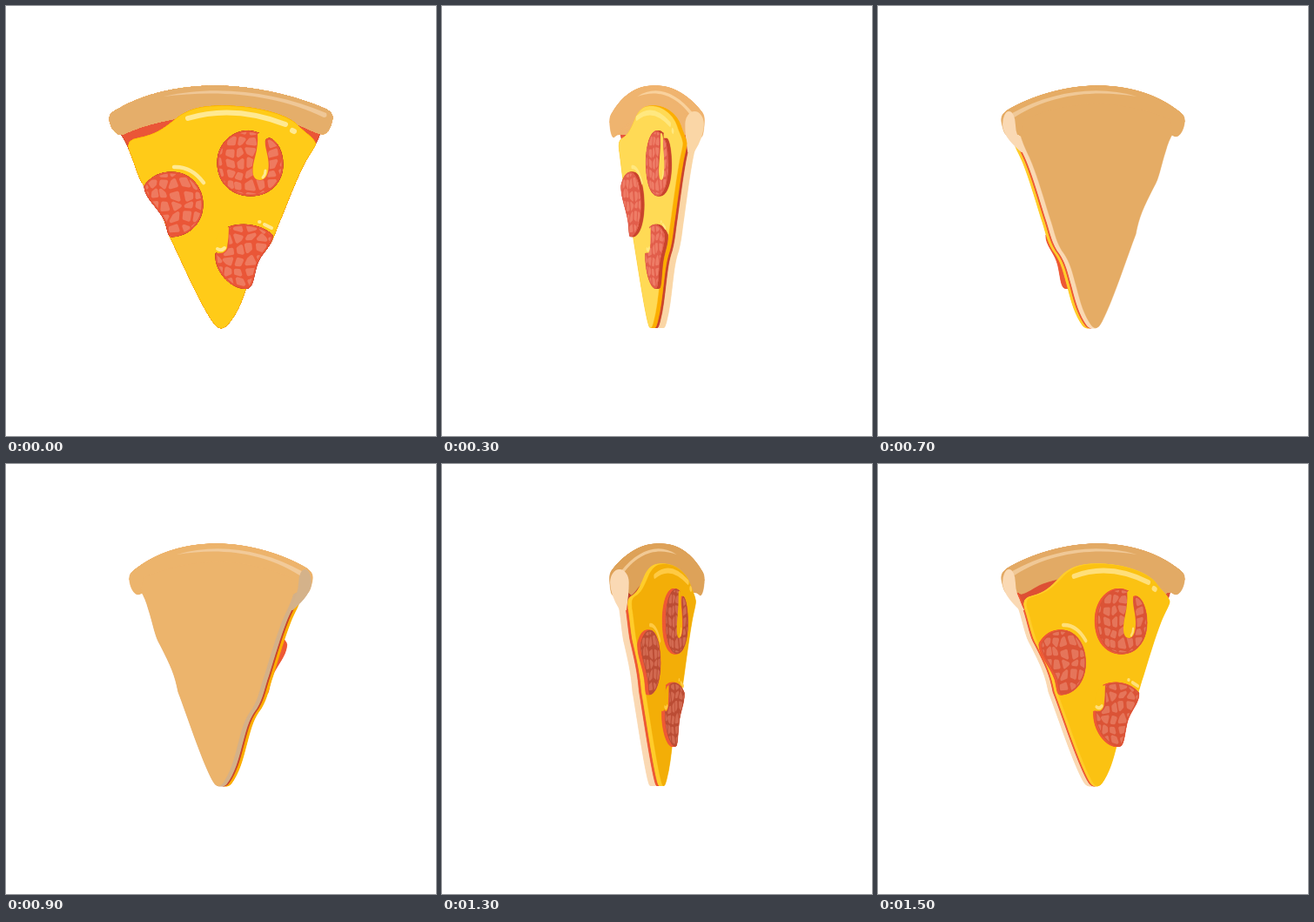
Recreate the animation shown at these times as an HTML page with a canvas. Size 494 by 494 pixels, loop 1.6 s.

```html
<!DOCTYPE html>
<html lang="en">
<head>
<meta charset="utf-8">
<title>Turning pizza slice</title>
<style>
html, body { margin: 0; width: 100%; height: 100%; overflow: hidden; background: #fff; }
canvas { display: block; }
</style>
</head>
<body>
<canvas width="494" height="494"></canvas>
<script>
const ctx = document.querySelector('canvas').getContext('2d');
const AXIS = 247;
const ANGLES = [0, 40, 55, 70, 90, 110, 125, 140];   // one half turn
const STEP = 100;

// Each tone runs from shaded through frontal to lit.
const TONES = {
  cheese: ['f0a803', 'ffcb18', 'ffdd62'],
  shine: ['ffc433', 'ffe992', 'ffe87c'],
  sauce: ['b8402a', 'ea5637', 'e8553f'],
  crust: ['dba056', 'e5ae6a', 'f1b570'],
  back: ['dba056', 'e8b06a', 'f6be72'],
  rim: ['f2c993', 'efc797', 'fbd39d'],
  meat: ['b14a33', 'ea5637', 'e0604f'],
  spot: ['cc664d', 'ee7a5f', 'ee7c68']
};

const EDGE = `C150 185 152 198 160 208 C176 232 182 242 187 262
  C200 288 222 340 238 363 Q247 377 257 363 C268 349 272 334 277 320
  C284 300 287 292 298 281 C308 268 309 258 316 243 C326 218 333 200 342 182`;
const body = new Path2D(`M131 146 C136 152 139 158 142 166 ${EDGE}
  C348 170 355 162 360 148 L355 130 Q247 95 135 130Z`);
const cheese = new Path2D(`M142 166 ${EDGE} C348 170 357 160 355 157
  C352 150 342 145 335 137 C322 124 285 115 250 115 C232 115 212 116 195 130
  C180 142 172 148 152 152 Q137 154 142 166Z`);
const crust = new Path2D(`M119 130 C119 124 122 122 128 119 C160 100 202 92 240 92
  C285 92 335 104 368 119 C374 122 376 126 374 133 C372 140 370 146 364 147
  C355 146 345 139 332 135 C285 122 220 122 190 130 C165 135 150 140 135 147
  C127 150 120 140 119 130Z`);
const rim = new Path2D('M181 104 C240 90 310 98 368 123 Q370 128 365 128 C310 101 245 96 181 104Z');
const drips = new Path2D(`M289 147 Q294 143 298 152 C297 160 299 164 300 170 C304 186 301 200 292 200
  C282 200 282 188 286 174 Q290 160 289 147Z
  M256 254 C241 258 240 270 241 282 Q250 287 254 278 Q256 266 256 254Z`);
const shine = [
  [6, 'M209 129 Q262 113 321 136'], [6, 'M329 143 L331 144'],
  [4.5, 'M193 185 Q213 184 227 203'], [4, 'M291 248 h.5 M297 251 L305 255'],
  [4, 'M243 279 Q247 282 251 278'], [3, 'M298 189 Q298 194 295 197']
].map(([width, d]) => ({ width, path: new Path2D(d) }));

// rise: how far each piece of meat stands out when seen from behind
const meats = [
  [21, `M290 146 C270 137 243 152 243 180 C243 204 260 218 281 218 C304 218 318 202 318 182
    C318 168 312 155 303 152 C296 152 297 160 299 168 C304 185 301 199 292 199
    C284 199 282 188 287 172 C290 162 291 150 290 146Z`],
  [13, `M160 205 C168 195 178 191 190 191 C214 191 226 210 226 228 C226 248 212 264 190 265
    C186 264 186 258 183 248 C176 232 160 222 159 208Z`],
  [14, `M256 254 C268 249 292 250 306 263 C307 275 292 284 288 298 C284 312 284 320 279 324
    C262 328 239 307 241 284 C247 286 254 282 255 274 C255 266 254 260 256 254Z`]
].map(([rise, d]) => ({ rise, path: new Path2D(d) }));

const noise = n => { const v = Math.sin(n) * 43758.5; return v - Math.floor(v); };

// Jittered mesh, each cell shrunk towards its middle.
function makeSpots() {
  const mesh = new Path2D();
  const node = (i, j) => [
    150 + i * 12.5 + 11 * (noise(i * 127.1 + j * 311.7) - .5),
    136 + j * 12.5 + 11 * (noise(i * 269.5 + j * 183.3) - .5)
  ];
  for (let i = 0; i < 14; i++) for (let j = 0; j < 16; j++) {
    const cell = [node(i, j), node(i + 1, j), node(i + 1, j + 1), node(i, j + 1)];
    const mid = [0, 1].map(a => cell.reduce((sum, p) => sum + p[a] / 4, 0));
    cell.forEach((p, n) => {
      const [x, y] = p.map((v, a) => mid[a] + (v - mid[a]) * .4);
      n ? mesh.lineTo(x, y) : mesh.moveTo(x, y);
    });
    mesh.closePath();
  }
  return mesh;
}
const spots = makeSpots();

function blend(from, to, amount) {
  const part = (hex, i) => parseInt(hex.slice(i, i + 2), 16);
  return `rgb(${[0, 2, 4].map(i => Math.round(part(from, i) + (part(to, i) - part(from, i)) * amount))})`;
}

function draw(degrees) {
  const angle = degrees * Math.PI / 180;
  const cos = Math.cos(angle), sin = Math.sin(angle), turn = Math.abs(sin);
  const front = cos > -1e-9;
  const leftSide = sin * cos < -1e-9;
  const side = leftSide ? -1 : 1;
  const lean = Math.abs(cos) * side;   // keeps the long slope towards the visible side
  const light = (front ? 1 : -1) * sin ** 3;
  const tone = name => {
    const [dark, mid, lit] = TONES[name];
    return blend(mid, light < 0 ? dark : lit, Math.abs(light));
  };
  const glance = Math.min(1, Math.max(0, (turn - .64) / .25));
  const [dough, red, yellow] = leftSide
    ? ['#fad9b4', '#ee5a36', '#ffcd2c']
    : [blend('d4b28a', 'fad6a6', glance), '#c9452e', '#fbae00'];
  const shift = (z, scale) => AXIS - AXIS * scale - z * sin;

  function place(path, z, color, scale = cos, dy = 0) {
    const placed = new Path2D();
    placed.addPath(path, new DOMMatrix([scale, 0, 0, 1, shift(z, scale), dy]));
    ctx.fillStyle = ctx.strokeStyle = color;
    ctx.lineWidth = .4;
    ctx.fill(placed);
    ctx.stroke(placed);
  }
  // Stack copies of a shape from far to near.
  function slab(path, low, high, color, scale = cos, dip = 0) {
    for (let d = 0; d <= high - low; d += .4) {
      const z = front ? low + d : high - d;
      place(path, z, color, scale, dip * turn * (z / 11.5) ** 4);
    }
  }
  // Cut end of the crust, tapering into the dough below.
  function cap() {
    const x = AXIS + 126 * lean, r = 11.5 * turn;
    const foot = AXIS + 103 * lean + 4 * sin * (front ? 1 : -.3), w = 4 * turn;
    ctx.fillStyle = dough;
    ctx.beginPath();
    ctx.ellipse(x, 136, r, 15, 0, Math.PI, 2 * Math.PI);
    ctx.quadraticCurveTo(x + r, 150, foot + w, 168);
    ctx.lineTo(foot - w, 168);
    ctx.quadraticCurveTo(x - r, 150, x - r, 136);
    ctx.fill();
  }
  function highlight() {
    ctx.save();
    ctx.transform(lean, 0, 0, 1, AXIS - AXIS * lean, 0);
    ctx.fillStyle = tone('rim');
    ctx.fill(rim);
    ctx.restore();
  }
  function onFace(z, paint) {
    if (cos < .01) return;
    ctx.save();
    ctx.transform(cos, 0, 0, 1, shift(z, cos), 0);
    paint();
    ctx.restore();
  }
  function meatFace(path) {
    ctx.fillStyle = tone('meat');
    ctx.fill(path);
    ctx.clip(path);
    ctx.fillStyle = ctx.strokeStyle = tone('spot');
    ctx.lineWidth = 4.2;
    ctx.fill(spots);
    ctx.stroke(spots);
    ctx.strokeStyle = tone('meat');
    ctx.lineWidth = 3;
    ctx.stroke(path);
  }

  ctx.fillStyle = '#fff';
  ctx.fillRect(0, 0, 494, 494);
  ctx.lineJoin = ctx.lineCap = 'round';

  if (front) {
    slab(body, -8, 0, dough);
    slab(body, 0, 3, red);
    place(body, 3, tone('sauce'));
    slab(crust, -11.5, 11.5, tone('crust'), lean, 4);
    highlight();
    cap();
    slab(cheese, 3, 8, yellow);
    place(cheese, 8, tone('cheese'));
    for (const { path } of meats) {
      slab(path, 8, 12, red);
      onFace(12, () => meatFace(path));
    }
    onFace(11, () => {
      ctx.fillStyle = tone('cheese');
      ctx.fill(drips);
      ctx.strokeStyle = tone('shine');
      for (const { width, path } of shine) {
        ctx.lineWidth = width;
        ctx.stroke(path);
      }
    });
  } else {
    for (const { path, rise } of meats) slab(path, 8, rise, '#ee5a36');
    slab(cheese, 6, 11, yellow, lean);
    slab(body, 3, 6, red, lean);
    slab(body, -5, 3, dough, lean);
    slab(crust, -11.5, 11.5, tone('back'), lean, 4);
    place(body, -5, tone('back'), lean);
    highlight();
    cap();
  }
}

function tick() {
  const step = Math.floor(performance.now() / STEP) % 16;
  draw(ANGLES[step % 8] + (step < 8 ? 0 : 180));
  requestAnimationFrame(tick);
}
tick();
</script>
</body>
</html>
```
